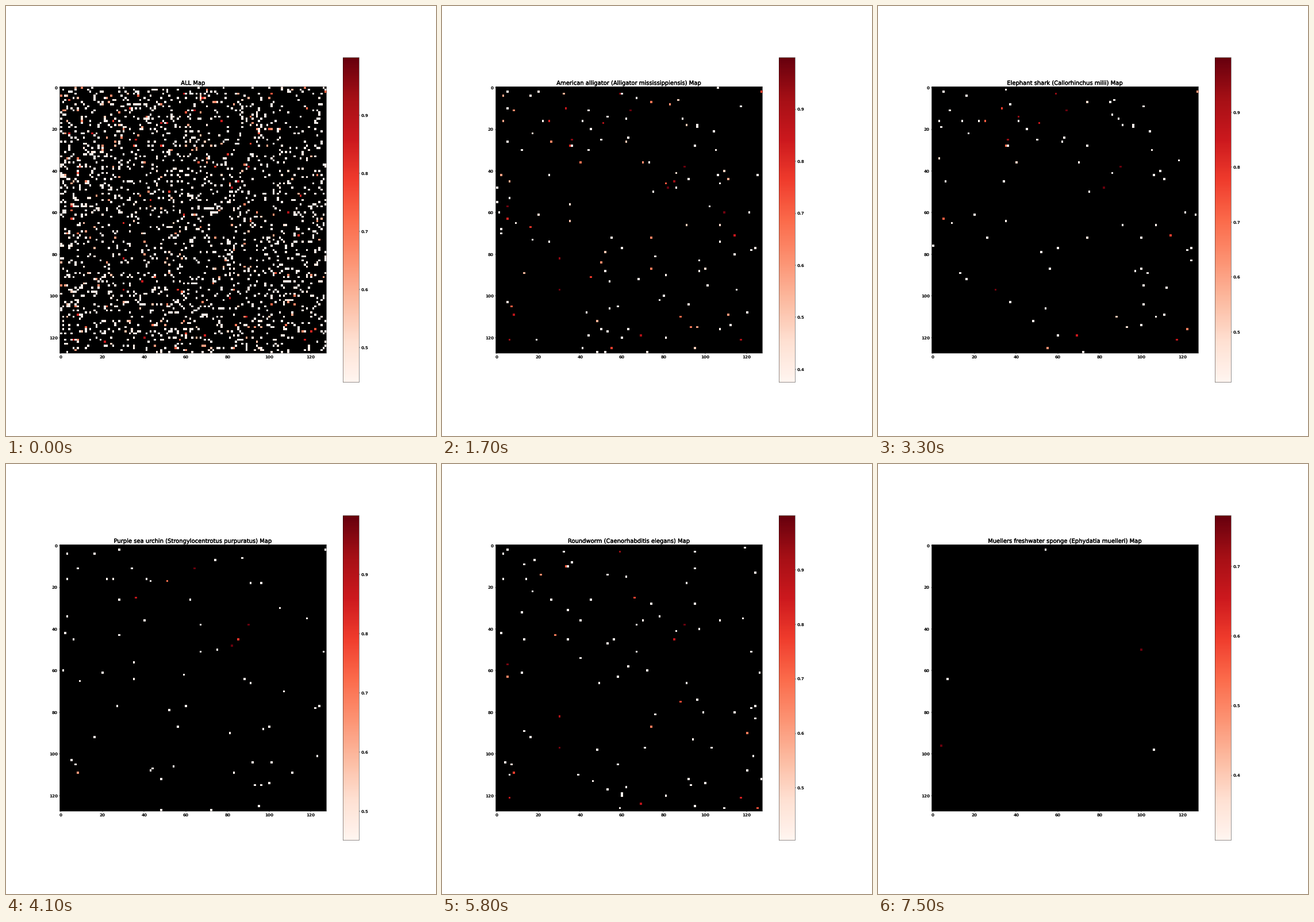
Recreate the animation shown at these times as a matplotlib script. Size 748 by 748 pixels, loop 7.6 s.

```python
import numpy as np
import matplotlib.pyplot as plt
from matplotlib.animation import FuncAnimation
from matplotlib.patheffects import withStroke

SPECIES = """Human (Homo sapiens)
House mouse (Mus musculus)
Norway rat (Rattus norvegicus)
Rabbit (Oryctolagus cuniculus)
Guinea pig (Cavia porcellus)
Dog (Canis lupus familiaris)
Cattle (Bos taurus)
Pig (Sus scrofa)
Horse (Equus caballus)
African elephant (Loxodonta africana)
Gray short-tailed opossum (Monodelphis domestica)
Tasmanian devil (Sarcophilus harrisii)
Platypus (Ornithorhynchus anatinus)
Chicken (Gallus gallus)
Zebra finch (Taeniopygia guttata)
Mallard (Anas platyrhynchos)
American alligator (Alligator mississippiensis)
Green sea turtle (Chelonia mydas)
Painted turtle (Chrysemys picta)
Green anole (Anolis carolinensis)
Common wall lizard (Podarcis muralis)
Burmese python (Python bivittatus)
Western clawed frog (Xenopus tropicalis)
Common toad (Bufo bufo)
Microcaecilia (Microcaecilia unicolor)
Two-lined caecilian (Rhinatrema bivittatum)
Coelacanth (Latimeria chalumnae)
West African lungfish (Protopterus annectens)
Zebrafish (Danio rerio)
Japanese medaka (Oryzias latipes)
Atlantic salmon (Salmo salar)
Spotted gar (Lepisosteus oculatus)
Elephant shark (Callorhinchus milii)
Thorny skate (Amblyraja radiata)
Sea lamprey (Petromyzon marinus)
Inshore hagfish (Eptatretus burgeri)
Vase tunicate (Ciona intestinalis)
Florida lancelet (Branchiostoma floridae)
Acorn worm (Saccoglossus kowalevskii)
Crown-of-thorns starfish (Acanthaster planci)
Purple sea urchin (Strongylocentrotus purpuratus)
Bat star (Patiria miniata)
Sea cucumber (Apostichopus japonicus)
Pacific oyster (Crassostrea gigas)
Owl limpet (Lottia gigantea)
California sea hare (Aplysia californica)
California two-spot octopus (Octopus bimaculoides)
Brachiopod (Lingula anatina)
Polychaete worm (Capitella teleta)
Leech (Helobdella robusta)
Fruit fly (Drosophila melanogaster)
Honey bee (Apis mellifera)
Red flour beetle (Tribolium castaneum)
Silkworm (Bombyx mori)
Water flea (Daphnia pulex)
Deer tick (Ixodes scapularis)
Horseshoe crab (Limulus polyphemus)
Roundworm (Caenorhabditis elegans)
Filarial worm (Brugia malayi)
Trichina worm (Trichinella spiralis)
Water bear (Hypsibius exemplaris)
Priapulid worm (Priapulus caudatus)
Blood fluke (Schistosoma mansoni)
Planarian (Schmidtea mediterranea)
Rotifer (Adineta vaga)
Starlet sea anemone (Nematostella vectensis)
Staghorn coral (Acropora millepora)
Hydra (Hydra vulgaris)
Moon jelly (Aurelia aurita)
Upside-down jellyfish (Cassiopea xamachana)
Placozoan (Trichoplax adhaerens)
Comb jelly (Mnemiopsis leidyi)
Sea gooseberry (Pleurobrachia bachei)
Demosponge (Amphimedon queenslandica)
Muellers freshwater sponge (Ephydatia muelleri)""".split("\n")
NAMES = ["ALL"] + SPECIES
N = 128
TOP = 0.9994
EMPTY = NAMES.index("Demosponge (Amphimedon queenslandica)")
LAST = len(NAMES) - 1

# How the maps thin out along the tree of life
STEPS = [1, 17, 25, 41, 58, 72]
EXTRA = [225, 60, 38, 23, 68, 6]              # cells beyond the shared core
KEEP = [0.95, 0.95, 0.85, 0.45, 0.25, 0.02]   # chance to keep a core cell
FADE = [0.02, 0.0, 0.06, 0.7, 0.5, 0.6]       # strength lost by the core
TINTED = [0.15, 0.04, 0.02, 0.03, 0.16, 0.15]
LOW = [0.42, 0.375, 0.366, 0.451, 0.404, 0.41]


def make_pool(rng, size):
    """Scatter cells, thinner at the upper right and left of the middle."""
    y, x = np.mgrid[:N, :N]
    p = 1 + 0.4 * np.exp(-x / 8)
    p -= 0.45 * np.exp(-((x - 105) / 30) ** 2 - ((y - 28) / 22) ** 2)
    p -= 0.4 * np.exp(-((x - 45) / 35) ** 2 - ((y - 76) / 14) ** 2)
    return rng.choice(N * N, size, replace=False, p=(p / p.sum()).ravel())


rng = np.random.default_rng(11)
CORE, POOL = np.split(make_pool(rng, 2030), [85])
STRENGTH = np.clip(1.25 * rng.random(CORE.size) ** 1.5 - 0.2, 0, 1)
FAME, LUCK = rng.random((2, POOL.size))
TINT = 0.4 + 0.55 * rng.random(POOL.size) ** 2


def put(grid, cells, t, lo, hi=TOP):
    grid.flat[cells] = lo + np.asarray(t) * (hi - lo)


def all_map(grid):
    lo = 0.4405
    put(grid, POOL, np.where(LUCK < 0.11, TINT * (0.4 + 5.4 * LUCK), 0.1 * LUCK ** 3), lo)
    put(grid, CORE, 0.85 * STRENGTH, lo)
    return lo, TOP


def sponge_map(grid):
    lo, hi = 0.307, 0.7728
    for x, y, t in [(54, 2, 0), (7, 64, 0), (106, 98, 0), (100, 50, 1), (4, 96, 1)]:
        put(grid, y * N + x, t, lo, hi)
    return lo, hi


def species_map(grid, i):
    extra, keep, fade, tinted, lo = (
        np.interp(i, STEPS, row) for row in (EXTRA, KEEP, FADE, TINTED, LOW))
    own = np.random.default_rng(500 + i)
    clade = np.random.default_rng(100 + i // 8).random(POOL.size)
    score = FAME + 0.5 * clade + 0.25 * own.random(POOL.size)
    pick = np.argsort(-score)[:int(extra)]
    put(grid, POOL[pick], np.where(LUCK[pick] < tinted, TINT[pick], 0), lo)

    kept = own.random(CORE.size) < keep ** (1 - 0.6 * STRENGTH)
    t = np.clip((STRENGTH - fade) / (1 - fade), 0, 1)
    put(grid, CORE[kept], t[kept], lo)
    return lo, TOP


def build(i):
    grid = np.full((N, N), np.nan)
    if i == 0:
        span = all_map(grid)
    elif i == EMPTY:
        span = -0.1, 0.1
    elif i == LAST:
        span = sponge_map(grid)
    else:
        span = species_map(grid, i)
    return np.ma.masked_invalid(grid), span


K = 11 / 20  # point sizes of a 20 inch layout on an 11 inch figure
style = {"font.family": "DejaVu Sans", "font.weight": "bold", "text.hinting": "none",
         "path.snap": False, "axes.linewidth": 0.8 * K, "axes.titlepad": 6 * K,
         "axes.titlesize": 19.2 * K, "axes.titleweight": "normal"}
for a in ("xtick", "ytick"):
    style.update({f"{a}.labelsize": 14 * K, f"{a}.major.size": 3.5 * K,
                  f"{a}.major.pad": 3.5 * K, f"{a}.major.width": 0.8 * K})
plt.rcParams.update(style)

fig = plt.figure(figsize=(11, 11), dpi=68, facecolor="white")
ax = fig.add_axes([0.125, 0.1925, 0.62, 0.62], facecolor="black")
cax = fig.add_axes([0.78375, 0.125, 0.03775, 0.755])
im = ax.imshow(build(0)[0], cmap="Reds", vmin=0.4405, vmax=TOP, interpolation="nearest")
fig.colorbar(im, cax=cax)
title = ax.set_title("", path_effects=[withStroke(linewidth=0.4, foreground="black")])


def draw(i):
    grid, span = build(i)
    im.set_data(grid)
    im.set_norm(plt.Normalize(*span))
    title.set_text(f"{NAMES[i]} Map")
    return im, title


anim = FuncAnimation(fig, draw, frames=len(NAMES), interval=100,
                     repeat=True, repeat_delay=0, blit=False)
plt.show()
```
